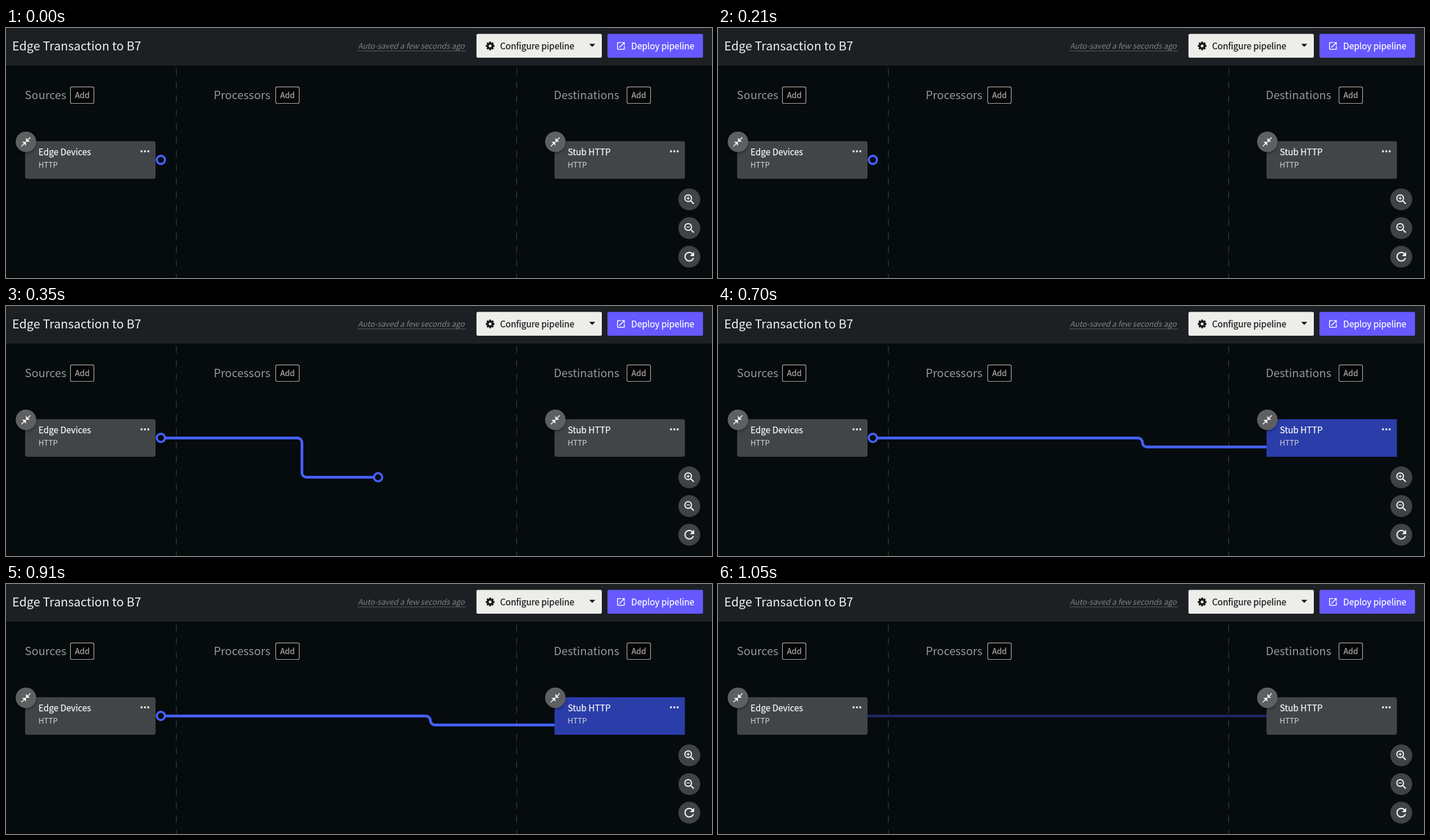
An HTML page with a canvas that plays this animation: 1256 by 446 pixels, repeating every 1400 ms.

```html
<!DOCTYPE html>
<html lang="en">
<head>
<meta charset="utf-8">
<title>Pipeline editor</title>
<style>
  html, body { margin: 0; width: 100%; height: 100%; overflow: hidden; background: #060b0e; }
  canvas, svg { position: absolute; left: 0; top: 0; width: 1256px; height: 446px; }
  text { font-family: "Noto Sans CJK JP", "Noto Sans CJK SC", "Noto Sans CJK", "Noto Sans", sans-serif; }
  .strong { stroke-width: .25px; }
  .strong text { stroke: currentColor; }
</style>
</head>
<body>
<canvas id="stage"></canvas>
<svg viewBox="0 0 1256 446">
  <text x="11" y="40" font-size="21.6" fill="#f1f1f1">Edge Transaction to B7</text>
  <text x="626" y="37" font-size="13.65" fill="#808285" font-style="italic">Auto-saved a few seconds ago</text>
  <g class="strong" font-size="15.4">
    <text x="879" y="38" fill="#16181a" color="#16181a">Configure pipeline</text>
    <text x="1112.3" y="38" fill="#fff" color="#fff">Deploy pipeline</text>
    <text x="57.8" y="227.4" fill="#f6f6f6" color="#f6f6f6">Edge Devices</text>
    <text x="999.4" y="227.4" fill="#f6f6f6" color="#f6f6f6">Stub HTTP</text>
  </g>
  <g font-size="13.4" fill="#d6d7d8">
    <text x="57.8" y="249.3">HTTP</text>
    <text x="999.2" y="249.3">HTTP</text>
  </g>
  <g font-size="20" fill="#96989a">
    <text x="33.6" y="127">Sources</text>
    <text x="369.4" y="127">Processors</text>
    <text x="974.5" y="127">Destinations</text>
  </g>
  <g class="strong" font-size="14" fill="#aba9a4" color="#aba9a4">
    <text x="122.7" y="125">Add</text>
    <text x="487.7" y="125">Add</text>
    <text x="1112.7" y="125">Add</text>
  </g>
</svg>
<script>
const W = 1256, H = 446, STEP = 350;
const BACK = '#060b0e', CARD = '#424547', BLUE = '#4560ff';
const ICONS = {
  shrink: 'M22 3.41 16.71 8.7 20 12h-8V4l3.29 3.29L20.59 2zM3.41 22l5.29-5.29L12 20v-8H4l3.29 3.29L2 20.59z',
  open: 'M19 19H5V5h7V3H5c-1.11 0-2 .9-2 2v14c0 1.1.89 2 2 2h14c1.1 0 2-.9 2-2v-7h-2zM14 3v2h3.59l-9.83 9.83 1.41 1.41L19 6.41V10h2V3z',
  reload: 'M17.65 6.35C16.2 4.9 14.21 4 12 4c-4.42 0-8 3.58-8 8s3.58 8 8 8c3.73 0 6.84-2.55 7.73-6h-2.08c-.82 2.33-3.04 4-5.65 4-3.31 0-6-2.69-6-6s2.69-6 6-6c1.66 0 3.14.69 4.22 1.78L13 11h7V4z'
};

const canvas = document.getElementById('stage');
const ctx = canvas.getContext('2d');
const ratio = window.devicePixelRatio || 1;
canvas.width = W * ratio;
canvas.height = H * ratio;

function box(x, y, w, h, r, fill, line) {
  ctx.beginPath();
  ctx.roundRect(x, y, w, h, r);
  ctx.fillStyle = fill;
  ctx.fill();
  if (line) {
    ctx.strokeStyle = line;
    ctx.lineWidth = 1.2;
    ctx.stroke();
  }
}

function disc(x, y, r, fill) {
  ctx.beginPath();
  ctx.arc(x, y, r, 0, Math.PI * 2);
  ctx.fillStyle = fill;
  ctx.fill();
}

function polyline(points, color, width, radius = 0) {
  const last = points.length - 1;
  ctx.beginPath();
  ctx.moveTo(...points[0]);
  for (let i = 1; i < last; i++) ctx.arcTo(...points[i], ...points[i + 1], radius);
  ctx.lineTo(...points[last]);
  ctx.strokeStyle = color;
  ctx.lineWidth = width;
  ctx.stroke();
}

function icon(name, x, y, scale, fill) {
  ctx.save();
  ctx.translate(x, y);
  ctx.scale(scale, scale);
  ctx.translate(-12, -12);
  ctx.fillStyle = fill;
  ctx.fill(new Path2D(ICONS[name]));
  ctx.restore();
}

function gear(x, y) {
  ctx.save();
  ctx.translate(x, y);
  ctx.fillStyle = '#16181a';
  for (let i = 0; i < 8; i++) {
    ctx.fillRect(-1.7, -7.7, 3.4, 4);
    ctx.rotate(Math.PI / 4);
  }
  ctx.restore();
  ctx.beginPath();
  ctx.arc(x, y, 4.3, 0, Math.PI * 2);
  ctx.strokeStyle = '#16181a';
  ctx.lineWidth = 3.6;
  ctx.stroke();
}

function port(x, y) {
  disc(x, y, 7.3, BACK);
  ctx.strokeStyle = BLUE;
  ctx.lineWidth = 3.8;
  ctx.stroke();
}

function header() {
  box(0, 0, W, 67, 0, '#1d2023');
  ctx.setLineDash([1.3, 1.5]);
  polyline([[626, 40.8], [818, 40.8]], '#8b8d90', 1.2);
  ctx.setLineDash([]);
  box(837, 10.5, 223, 42.5, 2.5, '#edeeea');
  gear(861.3, 32);
  ctx.beginPath();
  ctx.moveTo(1037.5, 28.3);
  ctx.lineTo(1048.3, 28.3);
  ctx.lineTo(1042.9, 33.8);
  ctx.fillStyle = '#16181a';
  ctx.fill();
  box(1070, 10.5, 170, 42.5, 2.5, '#6559ff');
  icon('open', 1094, 32, .75, '#fff');
}

function columns() {
  ctx.setLineDash([12.2, 12.2]);
  for (const x of [303, 908.5]) polyline([[x, 72], [x, H]], '#3d4143', 1.2);
  ctx.setLineDash([]);
  for (const x of [114.6, 479.8, 1104.8]) box(x, 105.1, 41.8, 29.4, 2.5, '#040506', '#b3afa6');
}

function card(x, active) {
  box(x, 202, 232, 67, active ? 0 : 4, active ? '#2b3da9' : CARD);
  for (let i = 0; i < 3; i++) disc(x + 207.2 + i * 6, 220, 1.9, '#e4e5e5');
  ctx.save();
  ctx.shadowColor = 'rgba(0,0,0,.45)';
  ctx.shadowBlur = 5 * ratio;
  ctx.shadowOffsetY = 2 * ratio;
  disc(x + 1.5, 203, 18.3, '#5d5f61');
  ctx.restore();
  icon('shrink', x + 1.5, 203, .86, '#f2f2f2');
}

function lens(y, plus) {
  const x = 1213.6, ink = '#f4f4f4';
  disc(1215.6, y, 19.5, '#404345');
  ctx.beginPath();
  ctx.arc(x, y - 2, 6, 0, Math.PI * 2);
  ctx.strokeStyle = ink;
  ctx.lineWidth = 1.9;
  ctx.stroke();
  polyline([[x + 4.2, y + 2.2], [x + 10, y + 8]], ink, 2.2);
  polyline([[x - 3, y - 2], [x + 3, y - 2]], ink, 1.4);
  if (plus) polyline([[x, y - 5], [x, y + 1]], ink, 1.4);
}

function tools() {
  lens(305.7, true);
  lens(357, false);
  disc(1215.6, 408, 19.5, '#404345');
  icon('reload', 1215.6, 408, 1.08, '#f4f4f4');
}

// Wire running right from the left card, dropping at the bend.
function wire(bend, endX, endY) {
  polyline([[275.5, 235.5], [bend, 235.5], [bend, endY], [endX, endY]], BLUE, 4.8, 8);
}

// Phases: idle, dragging, over the right card, connected.
function draw(phase) {
  ctx.setTransform(ratio, 0, 0, ratio, 0, 0);
  box(0, 0, W, H, 0, BACK);
  header();
  columns();
  if (phase === 1) {
    wire(526.5, 662, 305.5);
    port(662, 305.5);
  }
  if (phase === 2) wire(755, 976, 251.5);
  if (phase === 3) polyline([[266, 235.5], [976, 235.5]], '#1f2763', 4.6);
  card(34, false);
  card(975.8, phase === 2);
  if (phase < 3) port(275.5, 235.3);
  tools();
}

const start = performance.now();
let shown = -1;
function tick() {
  const phase = Math.floor((performance.now() - start) / STEP) % 4;
  if (phase !== shown) draw(shown = phase);
  requestAnimationFrame(tick);
}
tick();
</script>
</body>
</html>
```
